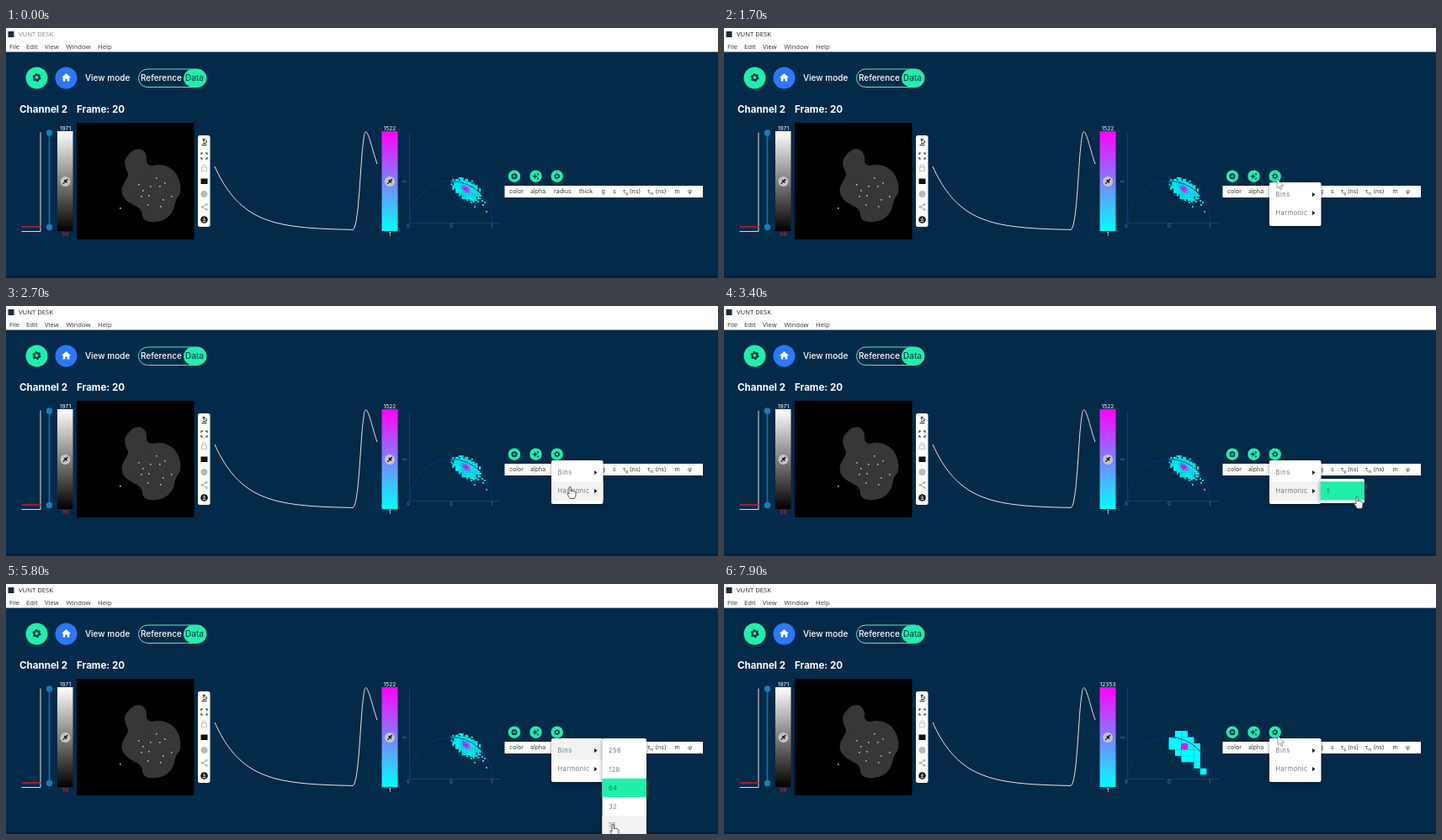
An HTML page that plays this animation: 846 px wide and 298 px high, repeating every 8000 ms.

```html
<!DOCTYPE html>
<html lang="en">
<head>
<meta charset="utf-8">
<title>Phasor view</title>
<style>
  html, body { margin: 0; width: 100%; height: 100%; overflow: hidden; background: #042a49; }
  svg { display: block; width: 846px; height: 298px; font-family: Inter, sans-serif; }
  .bar { font: 7.7px "Open Sans", sans-serif; fill: #333; }
  .label { font-size: 10px; font-weight: 500; fill: #fff; }
  .head { font-size: 11.6px; font-weight: 700; fill: #fff; }
  .num { font-size: 6.7px; fill: #fff; text-anchor: middle; }
  .axis { font-size: 5.5px; fill: #6e8296; text-anchor: middle; }
  .cols { font-size: 7.1px; fill: #3c3c3c; }
  .sub { font-size: 4.5px; }
  .menu { font-size: 7.5px; letter-spacing: .5px; fill: #777; }
  .panel { fill: #fff; filter: drop-shadow(0 1px 2px rgba(0,0,0,.45)); }
  .hover { fill: #f2f2f2; }
  .tip { font-size: 6.5px; font-weight: 500; fill: #e8e8e8; text-anchor: middle; }
</style>
</head>
<body>
<svg viewBox="0 0 846 298">
  <defs>
    <linearGradient id="gray" x2="0" y2="1"><stop stop-color="#fff"/><stop offset="1" stop-color="#000"/></linearGradient>
    <linearGradient id="cool" x2="0" y2="1"><stop stop-color="#f0f"/><stop offset="1" stop-color="#0ff"/></linearGradient>
    <g id="gear">
      <circle r="2.9" fill="none" stroke="#06304a" stroke-width="2"/>
      <circle r="4.3" fill="none" stroke="#06304a" stroke-width="1.5" stroke-dasharray="2.25 2.25"/>
    </g>
    <g id="picker">
      <circle r="6" fill="#c4c4c8"/>
      <path d="M-2.8 2.8L.8-.8" stroke="#333" stroke-width="1.5"/>
      <path d="M-.8-1.4L1.4.8M.3-.3L2.3-2.3" stroke="#222" stroke-width="1.7" stroke-linecap="round"/>
    </g>
  </defs>

  <rect width="846" height="298" fill="#042a49"/>
  <rect y="295" width="846" height="3" fill="#03213b"/>
  <rect width="846" height="28.5" fill="#fff"/>
  <rect x="2.5" y="4" width="7" height="7" fill="#1c2c3a"/>
  <text id="title" class="bar" x="15" y="10.3">VUNT DESK</text>
  <g class="bar">
    <text x="4" y="24.5">File</text><text x="24" y="24.5">Edit</text><text x="46" y="24.5">View</text>
    <text x="71.5" y="24.5">Window</text><text x="109" y="24.5">Help</text>
  </g>

  <circle cx="36.5" cy="59.5" r="13" fill="#1fefaa"/>
  <use href="#gear" x="36.5" y="59"/>
  <circle cx="71.5" cy="59.5" r="13" fill="#2b78f8"/>
  <path d="M71.5 54L66 59h1.7v4.5h2.6v-3h2.4v3h2.6V59H77z" fill="#fff"/>
  <text class="label" x="94" y="62.7">View mode</text>
  <rect x="157.5" y="49" width="80.5" height="21.5" rx="10.7" fill="none" stroke="#5fe8c0"/>
  <rect x="211" y="49" width="27" height="21.5" rx="10.7" fill="#1fefaa"/>
  <text class="label" x="160" y="63.4">Reference</text>
  <text class="label" x="213" y="63.4" style="fill:#0b4a52">Data</text>
  <text class="head" x="16" y="101.3">Channel 2</text>
  <text class="head" x="84" y="101.3">Frame: 20</text>

  <path d="M41 124.5V242.5H18.5" fill="none" stroke="#d8dde2"/>
  <path d="M18.5 237H42" stroke="#e0182c" stroke-width="1.4"/>
  <path d="M51.5 125V237.5" stroke="#1672ae" stroke-width="1.6"/>
  <circle cx="51.5" cy="125" r="3.7" fill="#1580bf"/><circle cx="51.5" cy="237.5" r="3.7" fill="#1580bf"/>
  <rect x="61" y="123" width="18.5" height="119" fill="url(#gray)"/>
  <rect x="446.5" y="123" width="19" height="119" fill="url(#cool)"/>
  <use href="#picker" x="70.5" y="183"/><use href="#picker" x="456" y="183"/>
  <text class="num" x="70.5" y="121.7">1971</text>
  <text class="num" x="70.5" y="248" style="fill:#d0203a">98</text>
  <text id="peak" class="num" x="456" y="121.7"></text>
  <text class="num" x="456" y="248">1</text>

  <rect x="84" y="113" width="139.5" height="139" fill="#000"/>
  <path d="M156 144.5C162 143 167 149 167 155C166 161 169 164 174 164C184 161 194 165 200 171C207 179 209 191 206 199C201 204 201 210 199 216C195 226 186 231 177 231C168 232 162 229 162 222C162 216 156 213 150 210C141 206 136 198 138 190C140 183 146 178 145 173C141 166 139 157 145 152C148 148 151 145 156 144.5Z" fill="#373737"/>
  <g id="specks"></g>

  <rect x="228" y="128" width="14.5" height="109" rx="2.5" fill="#fff"/>
  <g fill="none" stroke="#222" stroke-width="1.1">
    <path d="M232.5 139.5h6M234 137.5h2.500a2 2 0 0 0 1-3.600M235 131.500v4.500M233.500 133h3.500"/>
    <path d="M232 151v-2h2M237 149h2v2M239 154v2h-2M234 156h-2v-2"/>
    <path d="M233.700 166v-1.500a1.800 1.800 0 0 1 3.600 0V166M232.500 166h6v4.500h-6z" stroke="#c4c4c4"/>
    <path d="M238 210.500L233 213.300L238 216" stroke="#b8b8b8"/>
  </g>
  <rect x="231.500" y="179.500" width="8" height="6.500" fill="#111"/>
  <circle cx="235.500" cy="198" r="4" fill="#b9b9b9"/>
  <g fill="#b8b8b8"><circle cx="238" cy="210.300" r="1.500"/><circle cx="233" cy="213.300" r="1.500"/><circle cx="238" cy="216.200" r="1.500"/></g>
  <circle cx="235.500" cy="228.500" r="4.300" fill="#111"/>
  <path d="M235.500 225.800v2.500M233.800 227.600l1.700 1.700 1.700-1.700M233.500 230.700h4" fill="none" stroke="#fff" stroke-width=".9"/>

  <path id="decay" fill="none" stroke="#eadfe4"/>

  <path d="M479.500 125V232.500H588" fill="none" stroke="#1b3d5e"/>
  <text class="axis" x="478" y="238">0</text>
  <text class="axis" x="529" y="238">G</text>
  <text class="axis" x="577" y="238">1</text>
  <text class="axis" transform="translate(476 183) rotate(-90)">S</text>
  <g id="fine"></g>
  <g id="coarse"></g>
  <path d="M480 232.500A49 50 0 0 1 578 232.500" fill="none" stroke="#08348a" stroke-width=".9"/>

  <g fill="#1fefaa"><circle cx="604" cy="176.700" r="7.200"/><circle cx="629.500" cy="176.700" r="7.200"/><circle cx="654.700" cy="176.700" r="7.200"/></g>
  <circle cx="604" cy="176.700" r="3.500" fill="#06304a"/>
  <path d="M602 176.700h4M604 174.700v4" stroke="#1fefaa" stroke-width=".9"/>
  <path d="M628.500 173.500l1 2.300 2.300 1-2.300 1-1 2.300-1-2.300-2.300-1 2.300-1zM632 172.500l.5 1.200 1.200.5-1.200.5-.5 1.200-.5-1.200-1.200-.5 1.200-.5zM632 177.700l.5 1.200 1.200.5-1.200.5-.5 1.200-.5-1.200-1.200-.5 1.200-.5z" fill="#06304a"/>
  <use href="#gear" transform="translate(654.700 176.700) scale(.7)"/>
  <rect x="592.500" y="188" width="235.500" height="14" fill="#fff"/>
  <g class="cols">
    <text x="598" y="197.400">color</text><text x="623" y="197.400">alpha</text><text x="651" y="197.400">radius</text>
    <text x="681" y="197.400">thick</text><text x="707.500" y="197.400">g</text><text x="721" y="197.400">s</text>
    <text x="733" y="197">τ<tspan class="sub" dy="1.500">φ</tspan><tspan x="741" dy="-2">(ns)</tspan></text>
    <text x="762" y="197">τ<tspan class="sub" dy="1.500">m</tspan><tspan x="771.500" dy="-2">(ns)</tspan></text>
    <text x="794.500" y="197.400">m</text><text x="810" y="197.400">φ</text>
  </g>

  <g id="tip">
    <rect y="155" height="12" rx="2" fill="#5d6165"/>
    <text class="tip" y="163.300"></text>
  </g>
  <g id="main" class="menu">
    <rect class="panel" x="648" y="184" width="61.500" height="52" rx="2"/>
    <rect id="row" class="hover" x="648" width="61.500" height="22.300"/>
    <text x="655.500" y="201.300">Bins</text><text x="655.500" y="223.300">Harmonic</text>
    <path d="M699 196l3.600 2.600-3.600 2.600zM699 218l3.600 2.600-3.600 2.600z" fill="#222"/>
  </g>
  <g id="harmonic" class="menu"></g>
  <g id="bins" class="menu"></g>
  <path id="arrow" d="M0 0V11.200L2.600 8.800L4.300 12.600L6 11.900L4.300 8.100H7.900Z" fill="#fff" stroke="#444" stroke-width=".5"/>
  <path id="hand" d="M-1 1Q0-.8 1.200 1V6L2 5Q3.200 4.700 3.500 5.800Q5 5 5.400 6.300Q7 6 7 7.600V10.500Q6.800 13 5.500 14.500H.3Q-1 12-3 9.600Q-3.300 8-1.900 8.200L-1 9Z" fill="#fff" stroke="#333" stroke-width=".8"/>
</svg>
<script>
const $ = id => document.getElementById(id);
const LOOP = 8000, STEP = 100, ROW = 22.3;

function add(parent, tag, attrs, text) {
  const el = document.createElementNS('http://www.w3.org/2000/svg', tag);
  for (const key in attrs) el.setAttribute(key, attrs[key]);
  if (text) el.textContent = text;
  return parent.appendChild(el);
}

let seed = 20;
const rand = () => (seed = (seed * 16807) % 2147483647) / 2147483647;
const cell = (parent, x, y, size, fill) =>
  add(parent, 'rect', { x, y, width: size, height: size, fill });

function drawSpecks() {
  for (let i = 0; i < 160; i++) {
    const a = rand() * 6.283, r = Math.sqrt(rand());
    cell($('specks'), 173 + 30 * r * Math.cos(a), 195 + 28 * r * Math.sin(a), 1, rand() < .5 ? '#2f2f2f' : '#414141');
  }
  const bright = [[157, 186], [162, 193], [168, 210], [171, 188], [182, 188], [186, 204],
    [169, 199], [160, 200], [135, 214], [188, 184], [196, 200], [178, 178], [183, 212]];
  for (const [x, y] of bright) cell($('specks'), x, y, 1.6, '#bdbdbd');
}

function drawDecay() {
  let d = 'M248 165';
  for (let x = 250; x <= 412; x += 2) d += `L${x} ${(241 - 76 * Math.exp((248 - x) / 34)).toFixed(1)}`;
  $('decay').setAttribute('d', d + 'C418 239 420 190 423 150C425 130 426 123.500 427.500 123.500C431 124 436 148 441 162');
}

function drawPhasor() {
  const size = 1.87, cos = Math.cos(.62), sin = Math.sin(.62);
  for (let j = 0; j < 19; j++) for (let i = 0; i < 20; i++) {
    const x = 528.5 + i * size, y = 178 + j * size;
    const dx = x - 546, dy = y - 191.5;
    const u = (dx * cos + dy * sin) / 19, v = (dy * cos - dx * sin) / 10.5;
    const d = Math.hypot(u, v);
    if (d + (rand() - .5) * .45 > 1) continue;
    const heat = Math.max(0, 1 - d * 2.3) * (.75 + rand() * .5);
    const red = Math.round(255 * Math.min(1, heat * 1.25));
    cell($('fine'), x, y, size + .05, `rgb(${red},${255 - red},255)`);
  }
  for (const [x, y] of [[565, 205], [570, 218], [568, 207], [556, 212], [552, 207], [563, 199], [566, 210]])
    cell($('fine'), x, y, size, '#0ff');

  const big = 7.45;
  [[1, 2], [0, 3], [0, 4], [1, 4], [2, 4], [4, 4], [5, 5]].forEach(([from, to], r) => {
    for (let c = from; c <= to; c++)
      cell($('coarse'), 528.5 + c * big, 175 + r * big, big + .1, r === 2 && c === 2 ? '#f0f' : '#0ff');
  });
}

function buildSub(id, top, height, items, chosen) {
  const g = $(id);
  add(g, 'rect', { class: 'panel', x: 708.5, y: top, width: 52.5, height, rx: 2 });
  const rows = items.map((item, i) => {
    const y = top + 3.2 + i * ROW;
    const back = add(g, 'rect', { x: 708.5, y, width: 52.5, height: ROW, fill: 'none' });
    add(g, 'text', { x: 716, y: y + 14, fill: item === chosen ? '#2b7564' : '#777' }, item);
    return back;
  });
  return { g, top, rows, items, chosen };
}

// Grows in from its top left corner, fades out in place.
function reveal(g, t, spans, x, y) {
  const span = spans.find(([a, b]) => t >= a && t < b + 100);
  g.style.display = span ? '' : 'none';
  if (!span) return;
  const u = Math.min(1, (t - span[0]) / 120), k = 1 - (1 - u) ** 3;
  const s = .8 + .2 * k;
  g.setAttribute('opacity', t > span[1] ? 1 - (t - span[1]) / 100 : k);
  g.setAttribute('transform', `translate(${x} ${y}) scale(${s}) translate(${-x} ${-y})`);
}

const path = [
  [100, 786, 258], [500, 700, 210], [800, 630, 172], [1000, 632, 173], [1100, 648, 170],
  [1400, 656, 175], [1700, 657, 180], [2000, 664, 193], [2400, 666, 199], [2600, 667, 213],
  [2900, 676, 219], [3100, 712, 221], [3400, 752, 227], [3600, 750, 222], [3700, 750, 222],
  [4000, 712, 219], [4300, 690, 210], [4600, 686, 204], [4700, 687, 203], [4800, 687, 203],
  [5100, 714, 205], [5700, 720, 285], [5800, 721, 286], [6000, 721, 286], [6500, 681, 232],
  [6800, 662, 190], [7100, 655, 178], [7300, 655, 178], [7900, 658, 181]
];

function pointAt(t) {
  const i = path.findIndex(p => p[0] > t);
  if (i < 0) return path[path.length - 1].slice(1);
  const [t0, x0, y0] = path[Math.max(0, i - 1)], [t1, x1, y1] = path[i];
  const k = t1 > t0 ? (t - t0) / (t1 - t0) : 0;
  return [x0 + (x1 - x0) * k, y0 + (y1 - y0) * k];
}

function showTip(t) {
  const settings = t >= 7000 && t < 7400, run = t >= 800 && t < 1200;
  $('tip').style.display = settings || run ? '' : 'none';
  const mid = settings ? 654.5 : 629.5, half = settings ? 17.5 : 18.5;
  const [box, text] = $('tip').children;
  box.setAttribute('x', mid - half);
  box.setAttribute('width', half * 2);
  text.setAttribute('x', mid);
  text.textContent = settings ? 'Settings' : 'Run gmm';
}

function render(t) {
  const [x, y] = pointAt(t);
  const hand = t >= 2000 && t < 6100;
  $('arrow').style.display = t >= 100 && !hand ? '' : 'none';
  $('hand').style.display = hand ? '' : 'none';
  for (const id of ['arrow', 'hand']) $(id).setAttribute('transform', `translate(${x} ${y})`);

  const updated = t >= 6300;
  $('fine').style.display = updated ? 'none' : '';
  $('coarse').style.display = updated ? '' : 'none';
  $('peak').textContent = updated ? '12353' : '1522';
  $('title').style.fill = t < 1500 ? '#8a8a8a' : '#222';

  showTip(t);
  const onHarmonic = t >= 2600 && t < 4300;
  $('row').style.display = hand ? '' : 'none';
  $('row').setAttribute('y', onHarmonic ? 209.5 : 187.2);
  reveal($('main'), t, [[1555, 6100], [7455, 8100]], 648, 184);
  reveal(bins.g, t, [[2355, 2580], [4355, 6100]], 708.5, 184);
  reveal(harmonic.g, t, [[2855, 4280]], 708.5, 206);
  for (const { top, rows, items, chosen } of [bins, harmonic])
    rows.forEach((row, i) => {
      const over = x > 708 && Math.floor((y - top - 3.2) / ROW) === i;
      row.setAttribute('fill', items[i] === chosen ? '#1fefaa' : over ? '#f2f2f2' : 'none');
    });
}

drawSpecks();
drawDecay();
drawPhasor();
const bins = buildSub('bins', 184, 119, ['256', '128', '64', '32', '16'], '64');
const harmonic = buildSub('harmonic', 206, 29, ['1'], '1');

const start = performance.now();
function tick() {
  const t = (performance.now() - start) % LOOP;
  render(Math.floor(t / STEP) * STEP);
  requestAnimationFrame(tick);
}
tick();
</script>
</body>
</html>
```
